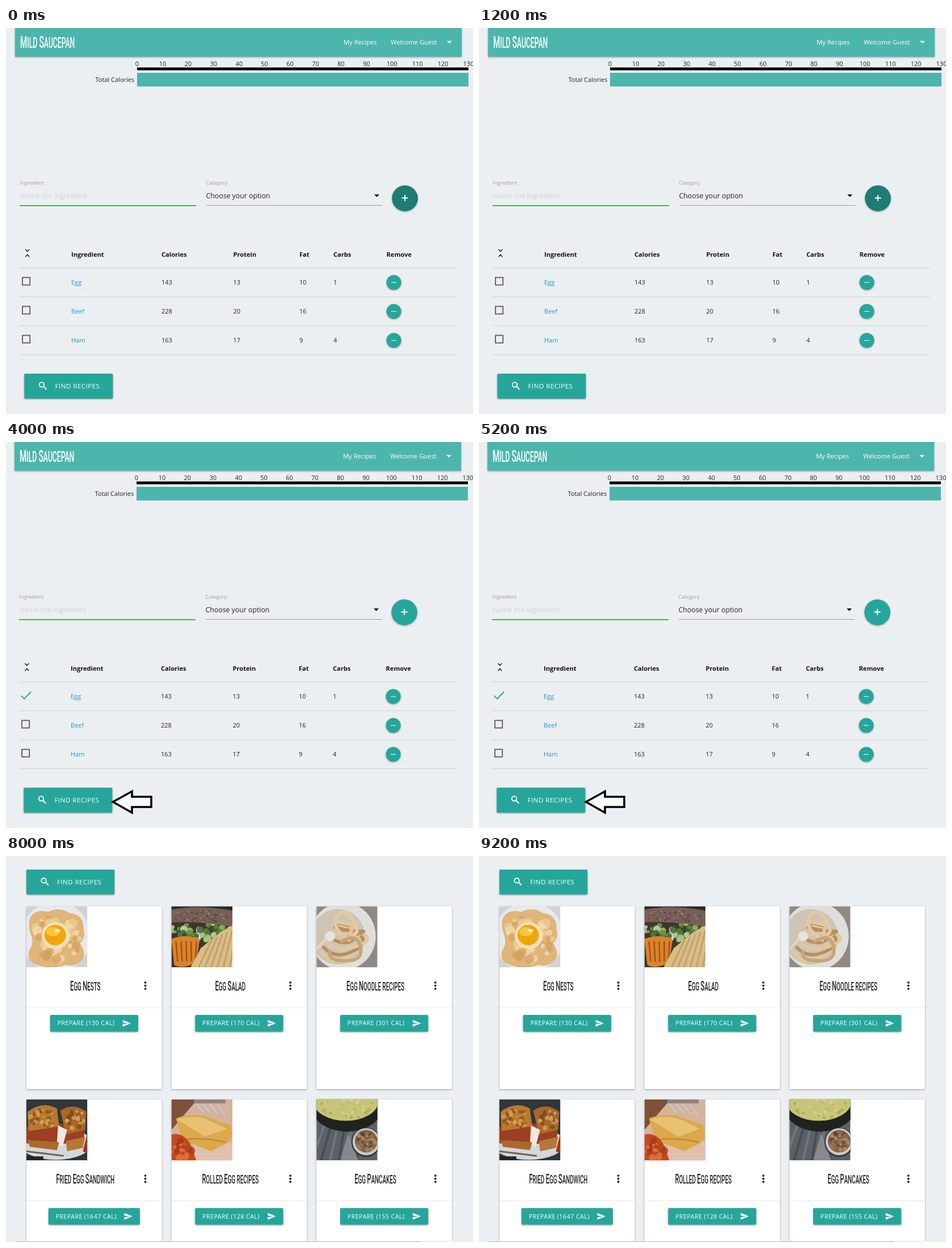
These frames come from a looping animation (823 by 680 pixels, 10000 ms). An HTML page:

```html
<!DOCTYPE html>
<html lang="en">
<head>
<meta charset="utf-8">
<title>Recipe finder</title>
<style>
  html, body { margin: 0; width: 100%; height: 100%; overflow: hidden; background: #eceff1; }
  svg { display: block; }
  text { font-family: "Open Sans", "Noto Sans", sans-serif; font-size: 11px; fill: #222; }
  .head { font-weight: 700; font-size: 11.1px; fill: #111; }
  .nav { font-size: 11.2px; fill: #fff; }
  .label { font-size: 9px; fill: #9e9e9e; }
  .field { font-size: 12.3px; }
  .hint { font-size: 12.3px; fill: #d1d1d1; }
  .link { fill: #1c97cf; }
  .find { font-size: 11.5px; letter-spacing: .5px; fill: #fff; }
  .cook { font-size: 10.6px; letter-spacing: .5px; fill: #fff; }
  .display { font-family: Roboto, "Liberation Sans", sans-serif; font-weight: 500; text-transform: uppercase; }
  .display tspan { font-size: 1.15em; }
  .raised { filter: drop-shadow(0 1px 1.5px rgba(0, 0, 0, .38)); }
  .lifted { filter: drop-shadow(0 3px 5px rgba(0, 0, 0, .45)); }
  .scene { animation: show 10s step-end infinite; }
  @keyframes show { 0% { visibility: visible; } 20%, 100% { visibility: hidden; } }
</style>
</head>
<body>
<svg id="stage" width="823" height="680" viewBox="0 0 823 680"></svg>
<script>
const TEAL = '#26a69a', PALE = '#4db6ac', BG = '#eceff1';

const rect = (x, y, w, h, fill, more = '') =>
  `<rect x="${x}" y="${y}" width="${w}" height="${h}" fill="${fill}" ${more}/>`;
const circle = (x, y, r, fill, more = '') =>
  `<circle cx="${x}" cy="${y}" r="${r}" fill="${fill}" ${more}/>`;
const oval = (x, y, rx, ry, fill, more = '') =>
  `<ellipse cx="${x}" cy="${y}" rx="${rx}" ry="${ry}" fill="${fill}" ${more}/>`;
const shape = (d, fill) => `<path d="${d}" fill="${fill}"/>`;
const line = (d, color, width, more = '') =>
  `<path d="${d}" fill="none" stroke="${color}" stroke-width="${width}" ${more}/>`;
const text = (s, x, y, cls = '', anchor = 'start') =>
  `<text x="${x}" y="${y}" class="${cls}" text-anchor="${anchor}">${s}</text>`;
const move = (x, y, body, k = 1) =>
  `<g transform="translate(${x} ${y}) scale(${k})">${body}</g>`;
const each = (n, f) => Array.from({ length: n }, (_, i) => f(i)).join('');

// Narrow hand-lettered look: capitals with taller initials
const display = (s, x, y, size, fill, anchor = 'start') =>
  `<text class="display" transform="translate(${x} ${y}) scale(.47 1)" text-anchor="${anchor}"
    style="font-size:${size}px;fill:${fill}">${s.replace(/[A-Z]/g, '<tspan>$&</tspan>')}</text>`;

// Seeded specks inside an ellipse
function specks(seed, n, x, y, rx, ry, size, colors) {
  const rnd = () => (seed = (seed * 16807) % 2147483647) / 2147483647;
  return each(n, i => {
    const a = rnd() * 6.283, r = Math.sqrt(rnd());
    return circle((x + rx * r * Math.cos(a)).toFixed(1), (y + ry * r * Math.sin(a)).toFixed(1),
      (size * (.5 + rnd())).toFixed(1), colors[i % colors.length], 'opacity=".75"');
  });
}

const findButton = (x, y) => move(x, y,
  rect(0, 0, 156, 44, TEAL, 'rx="2" class="raised"') +
  circle(30.7, 19.3, 4.2, 'none', 'stroke="#fff" stroke-width="1.9"') +
  line('M33.8 22.4L39 27.6', '#fff', 2.2) +
  text('FIND RECIPES', 54.3, 26.3, 'find'));

const header = () =>
  rect(16, -5, 787, 55.5, PALE, 'class="raised"') +
  display('Mild Saucepan', 25, 35, 26, '#fff') +
  text('My Recipes', 595, 29, 'nav') +
  text('Welcome Guest', 678, 29, 'nav') +
  shape('M777 22.7h9l-4.5 4.5z', '#fff');

const chart = full =>
  text('Total Calories', 226.3, 95, '', 'end') +
  rect(231, 69.5, 584, 5, '#000') +
  (full ? rect(231, 79, 584, 24, PALE) +
    each(14, i => text(i * 10, 231 + i * 584 / 13, 67, '', 'middle')) : '');

const form = (focus, hover) =>
  text('Ingredient', 24.5, 276, 'label') +
  text('Name the Ingredient', 24.5, 300, 'hint') +
  (focus ? rect(24, 312, 311, 2, '#4caf50') : rect(24, 312, 311, 1, '#9e9e9e')) +
  text('Category', 352.5, 276, 'label') +
  text('Choose your option', 352.5, 300, 'field') +
  shape('M649 293.3h9l-4.5 4.5z', '#000') +
  rect(353, 312, 310, 1, '#9e9e9e') +
  circle(703, 300, 22.8, hover ? '#1d7d74' : TEAL, 'class="raised"') +
  line('M697.5 299.5h11M703 294v11', '#fff', 1.9);

const foods = [['Egg', 143, 13, 10, 1], ['Beef', 228, 20, 16, ''], ['Ham', 163, 17, 9, 4]];
const wide = [115, 274, 400.5, 517, 577, 670.5];
const tight = [95.3, 259, 389, 509, 570.3, 667];

const tableHead = cols =>
  line('M34.2 390l3.5 3.6 3.5-3.6M34.2 403l3.5-3.6 3.5 3.6', '#222', 1.6) +
  ['Ingredient', 'Calories', 'Protein', 'Fat', 'Carbs', 'Remove']
    .map((s, i) => text(s, cols[i], 402.5, 'head')).join('') +
  rect(24, 422, 771, 1, '#d0d3d5');

const row = (food, i, checked) => move(0, i * 51,
  (checked ? line('M27.7 447l5.4 5.4L45 440', TEAL, 2)
    : rect(29, 439.5, 13.2, 13.2, 'none', 'stroke="#5a5a5a" stroke-width="1.8"')) +
  food.map((s, c) => text(s, wide[c], 452, c ? '' : 'link')).join('') +
  circle(683.5, 448.3, 13, TEAL, 'class="raised"') +
  rect(679, 447.8, 9, 1, '#fff') +
  rect(24, 473, 771, 1, '#d0d3d5'));

const pantry = (hover, checked) =>
  header() + chart(true) + form(true, hover) + tableHead(wide) +
  foods.map((f, i) => row(f, i, checked && !i)).join('') +
  findButton(32.3, 609);

const arrow = `<path d="M188.5 634L222 615.5V625H256V643H222V653Z" fill="#f6f8f9" stroke="#000" stroke-width="3.6"/>`;

// Dish pictures, 108 by 108
const nest = () =>
  rect(0, 0, 108, 108, '#cfd3d6') + circle(52, 54, 62, '#e6e9eb') +
  shape('M6 22Q14 4 38 10Q60 0 76 12Q102 14 101 40Q106 54 95 66Q108 84 98 96Q86 108 70 104Q44 112 26 106Q-2 100 5 78Q14 66 8 50Q2 34 6 22Z', '#dfb578') +
  specks(7, 55, 53, 57, 42, 43, 6, ['#eed09b', '#f4dfb5', '#d3a261']) +
  oval(52, 52, 25, 24, '#f3dfb6') + oval(51, 51, 19, 18, '#f0a50f') +
  oval(47, 45, 12, 8, '#f9c43a') + oval(55, 43, 5, 2.5, '#fff3cf');

const salad = () =>
  rect(0, 0, 108, 108, '#40352d') +
  rect(0, 0, 108, 10, '#292a2b') + specks(11, 60, 50, 44, 55, 18, 5, ['#5f8a3a', '#dce5cc', '#2f5421', '#9cbf68']) +
  shape('M0 6Q50 -4 108 8V36Q50 26 0 28Z', '#765f56') +
  specks(5, 50, 54, 18, 54, 11, 1.6, ['#54423d', '#9b8478']) +
  shape('M0 58Q24 48 50 58L44 100Q20 112 5 104Z', '#d9842a') +
  each(5, i => line(`M${8 + i * 9} 62l${3 - i} 36`, '#a84f12', 2.5)) +
  shape('M52 74L86 46L108 34V108H34Z', '#d8bd88') +
  each(6, i => line(`M${48 + i * 11} 108L${72 + i * 9} ${58 - i * 4}`, '#c3a06a', 3));

const noodle = () =>
  rect(0, 0, 108, 108, '#8f8a84') + oval(47, 53, 58, 60, '#e0dedb') + oval(38, 54, 48, 49, '#cec4b5') +
  each(7, i => line(`M${8 + i * 5} ${82 - i * 9}Q${30 + i * 6} ${110 - i * 13} ${64 + i % 3 * 7} ${84 - i * 8}T${34 + i * 4} ${24 + i * 6}`,
    i % 2 ? '#b78f60' : '#dfc7a0', 6, 'stroke-linecap="round"')) +
  line('M34 20Q48 2 60 18T72 44Q62 62 46 50T34 20', '#e2caa4', 6) +
  line('M42 64Q72 44 78 72T44 96Q20 96 24 78', '#c8a576', 6) +
  oval(24, 53, 9, 9, '#e7e3de') + line('M18 57L0 76', '#ddd7cd', 4);

const toast = () =>
  rect(0, 0, 108, 108, '#30363d') + oval(52, 78, 64, 29, '#d3d7da') +
  shape('M0 48L56 42L104 50L100 80L58 78L0 78Z', '#9d3d23') +
  shape('M2 22Q28 2 54 16L58 48L4 56Z', '#b9792f') + specks(9, 35, 30, 34, 23, 16, 3, ['#8d4f1b', '#d9a457']) +
  shape('M60 20Q82 4 106 22L104 54L70 62Z', '#a9672a') + specks(15, 30, 86, 36, 17, 17, 3, ['#7a4219', '#dca85a']) +
  shape('M56 46L72 54L64 84L54 78Z', '#f0e9df') +
  shape('M2 72L58 76L54 90L6 84Z', '#a96a2d') + shape('M70 74L104 66L100 86L72 92Z', '#b57837') +
  line('M0 92L66 100', '#77604b', 3) + rect(0, 101, 30, 7, '#22262b') + shape('M108 60L100 92L108 96Z', '#a63218');

const roll = () =>
  rect(0, 0, 108, 108, '#d5b29c') + shape('M0 0H46L0 54Z', '#7d5139') + oval(70, 100, 62, 30, '#dec0ad') +
  shape('M8 34Q30 24 60 30L104 46Q112 66 98 78L70 92Q48 82 20 74Z', '#dba94c') +
  shape('M10 36Q36 26 64 36L98 52L60 66Z', '#e8c272') + line('M20 72Q54 66 96 76', '#bd8432', 2.5) +
  each(4, i => line(`M${42 + i * 13} ${6 + i}l${16 - i} 18`, '#c9c6c4', 3)) + rect(40, 0, 56, 7, '#8f827c') +
  shape('M0 62Q22 58 34 80L44 108H0Z', '#c24a20') + specks(21, 20, 18, 88, 18, 17, 5, ['#e27a45', '#a93716']);

const pancake = () =>
  rect(0, 0, 108, 108, '#5d6167') +
  each(6, i => line(`M${i * 16 - 8} 108L${i * 12 + 14} 46`, i % 2 ? '#484c53' : '#72767b', 4)) +
  shape('M42 108L56 60L74 108Z', '#85898e') +
  oval(54, 8, 66, 49, '#1f221f') + oval(52, 3, 58, 35, '#c7c477') +
  specks(3, 36, 52, 12, 50, 22, 2.5, ['#dcd694', '#a5ab59']) +
  circle(88, 76, 26, '#33363a') + circle(88, 75, 24, '#c9c9c7') + circle(88, 74, 20, '#85644b') +
  specks(13, 45, 88, 74, 17, 17, 2.5, ['#b3906e', '#614431', '#9d7a59']);

const cards = [
  ['Egg Nests', 130, nest], ['Egg Salad', 170, salad], ['Egg Noodle recipes', 301, noodle],
  ['Fried Egg Sandwich', 1647, toast], ['Rolled Egg recipes', 128, roll], ['Egg Pancakes', 155, pancake]
];

function card([name, cal, art], i, lifted) {
  const w = cal > 999 ? 162 : 156, left = 120 - w / 2;
  return move(35 + i % 3 * 257, 520 + (i > 2 ? 342 : 0),
    rect(0, 0, 240, 324, '#fff', `rx="2" class="${lifted ? 'lifted' : 'raised'}"`) +
    `<svg width="108" height="108">${art()}</svg>` +
    display(name, 104.3, 149, 21, '#222', 'middle') +
    each(3, k => circle(210.7, 135 + k * 5.5, 1.9, '#111')) +
    rect(0, 179, 240, 1, '#e4e6e7') +
    rect(left, 192.5, w, 29.5, TEAL, 'rx="2" class="raised"') +
    text(`PREPARE (${cal} CAL)`, left + 13, 211, 'cook') +
    move(left + w - 27.5, 201.2, shape('M0 0L14.5 6L0 12V7.4L10 6L0 4.6Z', '#fff')));
}

const results = lifted => findButton(35, 455) +
  cards.map((c, i) => card(c, i, lifted && !i)).join('');

const scenes = [
  pantry(true, false),
  move(-1, 0, pantry(false, true)),
  move(-1, 0, pantry(false, true)) + arrow,
  move(2.7, -1, header() + chart(false) + form(false, false) + tableHead(tight)) + results(true),
  move(1.2, -428.5, results(false), .9945) + rect(0, 678, 823, 2, BG) + rect(17, 679, 714, 1, '#b4b6b7')
];

document.getElementById('stage').innerHTML = scenes.map((s, i) =>
  `<g class="scene" style="animation-delay:${i * 2 - 10}s">${s}</g>`).join('');
</script>
</body>
</html>
```
